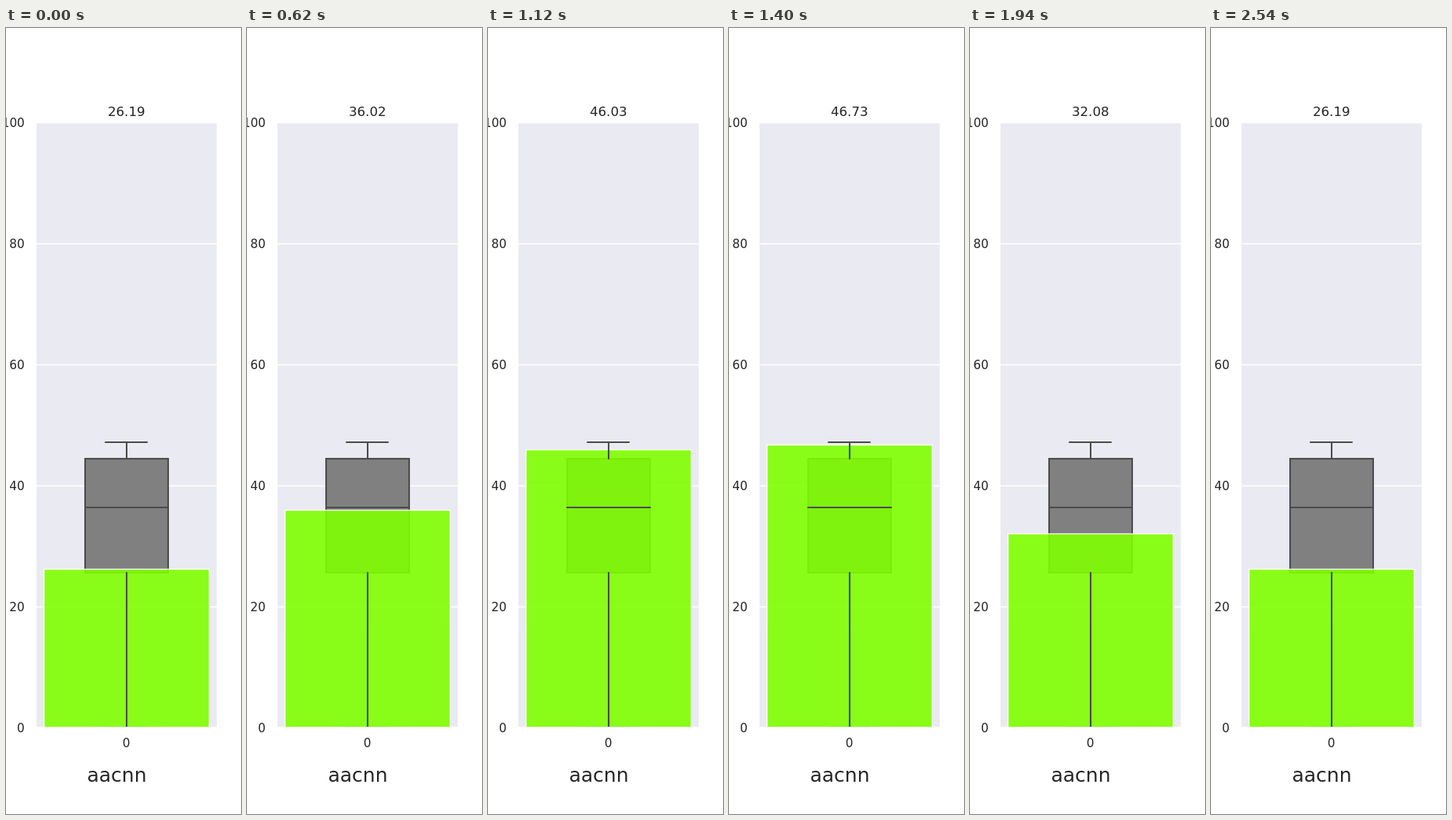
Recreate the animation shown at these times as an HTML page. Size 300x1000 px, loop 2560 ms.

```html
<!DOCTYPE html>
<html lang="en">
<head>
<meta charset="utf-8">
<title>Bar over box plot</title>
<style>
  html, body { margin: 0; width: 100%; height: 100%; overflow: hidden; background: #fff; }
  svg { display: block; width: 300px; height: 1000px; }
  text { font-family: "DejaVu Sans", sans-serif; font-size: 15.28px; fill: #262626; text-anchor: middle; }
  .tick { text-anchor: end; }
  #title { font-size: 16.67px; }
  #name { font-size: 25px; }
  #grid, #frame { fill: none; stroke: #fff; }
  #grid { stroke-width: 1.39; }
  #frame { stroke-width: 1.74; }
  #box, #lines { stroke: #4c4c4c; stroke-width: 2.08; }
  #lines { fill: none; stroke-linecap: round; }
  #bar { stroke: #fff; stroke-width: 1.39; }
</style>
</head>
<body>
<svg viewBox="0 0 300 1000">
  <clipPath id="plot"><rect x="37.5" y="120" width="232.5" height="770"/></clipPath>
  <rect x="37.5" y="120" width="232.5" height="770" fill="#eaeaf2"/>
  <g clip-path="url(#plot)">
    <path id="grid"/>
    <rect id="box" x="101" y="548" width="106" height="145" fill="#808080"/>
    <g opacity=".9"><rect id="bar" x="48.5" width="211"/></g>
    <path id="lines" d="M154 693V890M154 548V527M127 890H180M127 527H180M101 610H207"/>
  </g>
  <rect id="frame" x="38" y="120" width="232" height="770"/>
  <g id="ticks"></g>
  <text x="153.5" y="915">0</text>
  <text id="title" x="153.75" y="112"></text>
  <text id="name" x="141.5" y="959">aacnn</text>
</svg>
<script>
const LOOP = 2560, TICK = 20, LAST = LOOP / TICK - 1;
const BASE = 890, UNIT = 7.7;

// [ms, value] along the first half of the loop; the second half runs it backwards
const keys = [
  [0, 26.19], [160, 0], [320, 25.62], [340, 27.82], [520, 32.08], [600, 32.08], [620, 36.02],
  [820, 40.44], [840, 46.18], [920, 46.18], [940, 39.76], [1140, 46.73], [1260, 47.2]
];

const el = id => document.getElementById(id);
const yOf = v => Math.round(BASE - v * UNIT);
const bar = el("bar"), title = el("title");

function drawAxis() {
  let lines = "", labels = "";
  for (let v = 0; v <= 100; v += 20) {
    const y = yOf(v);
    lines += `M37 ${y + 0.5}H271`;
    labels += `<text class="tick" x="23.8" y="${y + 6}">${v}</text>`;
  }
  el("grid").setAttribute("d", lines);
  el("ticks").innerHTML = labels;
}

function valueAt(ms) {
  const k = Math.floor((ms % LOOP + 0.01) / TICK) % (LAST + 1);
  const t = Math.min(k, LAST - k) * TICK;
  const i = Math.max(1, keys.findIndex(([at]) => at >= t));
  const [t0, a] = keys[i - 1], [t1, b] = keys[i];
  return a + (b - a) * (t - t0) / (t1 - t0);
}

function draw(ms) {
  const v = valueAt(ms), y = yOf(v) + 0.5;
  bar.setAttribute("y", y);
  bar.setAttribute("height", BASE + 0.5 - y);
  bar.setAttribute("fill", v < 26 ? "#ffff14" : "#7fff00");
  title.textContent = v.toFixed(2);
}

const begin = performance.now();
function loop() {
  draw(performance.now() - begin);
  requestAnimationFrame(loop);
}
drawAxis();
draw(0);
requestAnimationFrame(loop);
</script>
</body>
</html>
```
